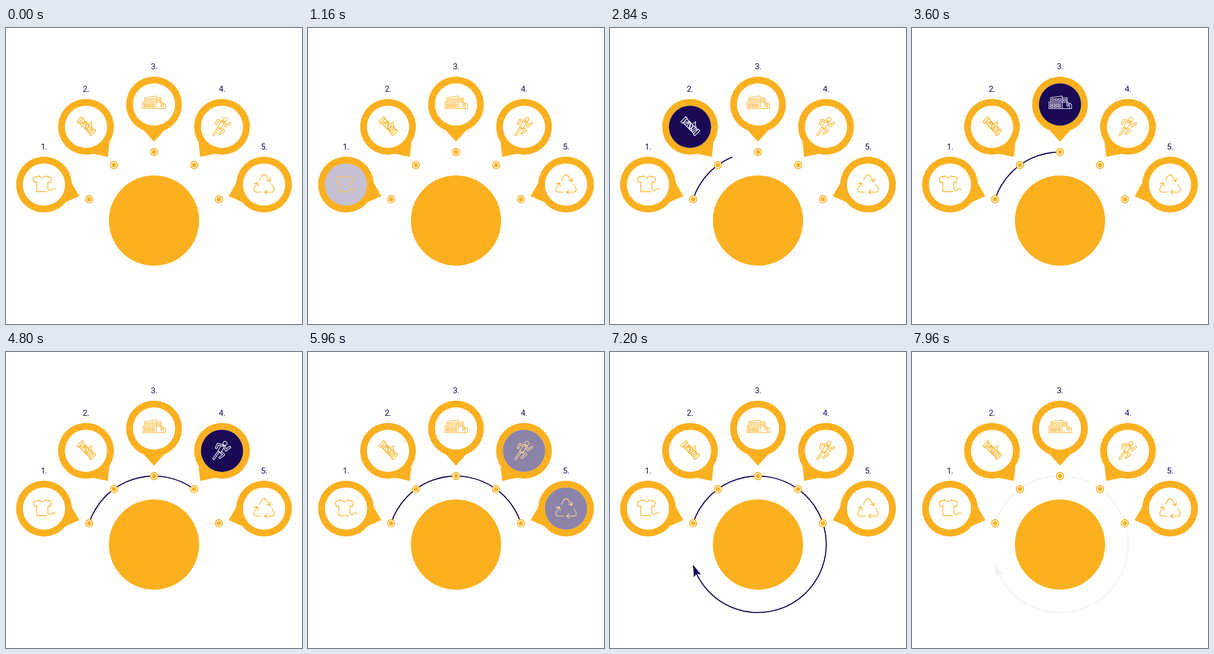
Write an HTML page that moves like this. It is 538 px wide and 538 px high and loops after 8000 ms.

```html
<!DOCTYPE html>
<html lang="en">
<head>
<meta charset="utf-8">
<title>Five step cycle</title>
<style>
  html, body { margin: 0; width: 100%; height: 100%; overflow: hidden; background: #fff; }
  svg { display: block; width: 100vw; height: 100vh; }
  text { font: 15px Roboto, sans-serif; letter-spacing: -.4px; text-anchor: middle; fill: #1b0955; }
  .icon { fill: none; stroke-width: 1.3; stroke-linecap: round; stroke-linejoin: round; }
</style>
</head>
<body>
<svg id="stage" viewBox="0 0 538 538"></svg>
<script>
const GOLD = '#fbb01f', NAVY = '#1b0955', LOOP = 8000, STEP = 1240, START = 1120;
const stage = document.getElementById('stage');
const path = (d, extra = '') => `<path d="${d}" ${extra}/>`;
const rect = (x, y, w, h) => `M${x} ${y}h${w}v${h}h${-w}z`;

// Each icon is drawn in stage coordinates; "back" is the colour behind it.
const shirt = () => path(`M74 297.5H56V280L51.500 281L49.300 273.500Q49.500 272 51 271.500L60.500 269
  Q66 275.500 71.500 269L81 271.500Q82.700 272 82.800 273.500L80.500 281L76 280V289
  C76 297 80 297 83 294S87 292 90 294`);

const spool = () => `<g transform="translate(146 178.500) rotate(45)">` +
  path(rect(-18, -6.5, 4, 13) + rect(14, -6.5, 4, 13) + rect(-14, -5, 28, 10) +
    'M-14 5L-7 -5L-4 5M-10 5L-5 -5L1 5M-3 -5L3 5L5 -5M1 -5L7 5L9 -5M10 5L12 -5') +
  '</g>' + path('M151 174Q157 168 155.500 172T157 181');

const building = () => {
  let d = rect(249, 134.5, 24, 12) + 'M252 134.500V126.500L273 123.500V146.500H290V139L286 136.500'
    + 'V146.500M273 127H282V135H273M275 129.500H280V132.500H275zM281.500 135V142H284V135H282';
  for (let i = 0; i < 3; i++) {
    d += rect(254.5 + i * 6, 128.5, 3.8, 3.5);
    for (const y of [137, 141.5]) d += rect(251.5 + i * 6.8, y, 4.6, 2.6);
  }
  return path(d, 'stroke-width="1.1"');
};

const runner = (ink, back) => {
  const limbs = 'M393.500 170L385 167.500L382 174M397 171.500L399.500 178.500L407 173'
    + 'M386 182L377.500 194M388 180.500L396 186.500L388.500 192';
  return path(limbs, 'stroke-width="4.2"') + path(limbs, `stroke="${back}" stroke-width="1.8"`) +
    path('M391 170.500L397 172.500L390.500 183L385 179.500z', `fill="${back}"`) +
    '<circle cx="398" cy="166" r="3.700"/>';
};

const recycle = () => path(`M460.500 277L464.500 269.500Q469 263.500 473.500 269.500L479.500 279M480.500 272.500L479.700 279.300L473.500 276.500
  M483 284L487 291Q489 298 483 298.300H470M474.500 294.500L470 298.300L474.500 302
  M464 298.300H455Q448.500 297 451 291L457 281.500M451 283L457 281.500L458.500 288`);

const pins = [
  [69, 284.6, shirt], [145.4, 179.6, spool], [269, 139, building],
  [392.6, 179.6, runner], [469, 284.6, recycle]
];

const drawIcon = (icon, ink, back) =>
  `<g class="icon" stroke="${ink}">${icon(ink, back)}</g>`;

const drawPin = ([x, y, icon], i) => `
  <g transform="translate(${x} ${y})" fill="${GOLD}">
    <path d="M46.500 -19L67.500 0L46.500 19z" transform="rotate(${18 + 36 * i})"/>
    <circle r="50.600"/><circle r="38.400" fill="#fff"/>
  </g>
  ${drawIcon(icon, GOLD, '#fff')}
  <g class="active" opacity="0">
    <circle cx="${x}" cy="${y}" r="38.400" fill="${NAVY}"/>${drawIcon(icon, '#fff', NAVY)}
  </g>
  <text x="${x}" y="${y - 64}">${i + 1}.</text>`;

const drawDot = (_, i) => {
  const a = (36 * i - 162) * Math.PI / 180;
  const at = `cx="${269 + 124 * Math.cos(a)}" cy="${349.5 + 124 * Math.sin(a)}"`;
  return `<circle ${at} r="6.500" fill="#fff" stroke="${GOLD}" stroke-width="1.800"/>
    <circle ${at} r="3.900" fill="${GOLD}"/>`;
};

const arc = 'M151.070 311.180A124 124 0 1 1 151.070 387.820';
stage.innerHTML = `
  <mask id="sweep" maskUnits="userSpaceOnUse" x="0" y="0" width="538" height="538">
    ${path(arc, 'id="reveal" pathLength="324" fill="none" stroke="#fff" stroke-width="30"')}
  </mask>
  <circle cx="269" cy="350" r="82" fill="${GOLD}"/>
  <g id="trail" mask="url(#sweep)">
    ${path(arc, `fill="none" stroke="${NAVY}" stroke-width="2"`)}
    ${path('M151 387L165.500 404.500L157.500 403L152.500 409.500z', `fill="${NAVY}"`)}
  </g>
  ${pins.map(drawPin).join('')}${pins.map(drawDot).join('')}`;

const active = stage.querySelectorAll('.active');
const reveal = document.getElementById('reveal');
const trail = document.getElementById('trail');
const ramp = (t, from, length) => Math.max(0, Math.min(1, (t - from) / length));
// Moment at which step i lights up, just as the line touches its dot.
const lightAt = i => i ? START + i * STEP - 200 : START;

function render(now) {
  const t = Math.floor(now % LOOP / 40) * 40;
  const angle = 144 * ramp(t, START, 4 * STEP) + 180 * ramp(t, START + 4 * STEP, 920);
  reveal.setAttribute('stroke-dasharray', `${angle} 700`);
  trail.setAttribute('opacity', 1 - ramp(t, 7500, 484));
  trail.setAttribute('visibility', angle ? 'visible' : 'hidden');
  active.forEach((el, i) => {
    const off = i < 4 ? lightAt(i + 1) : 7040;
    el.setAttribute('opacity', ramp(t, lightAt(i), 160) * (1 - ramp(t, off, 160)));
  });
}

const begin = performance.now();
function tick() {
  render(performance.now() - begin);
  requestAnimationFrame(tick);
}
tick();
</script>
</body>
</html>
```
